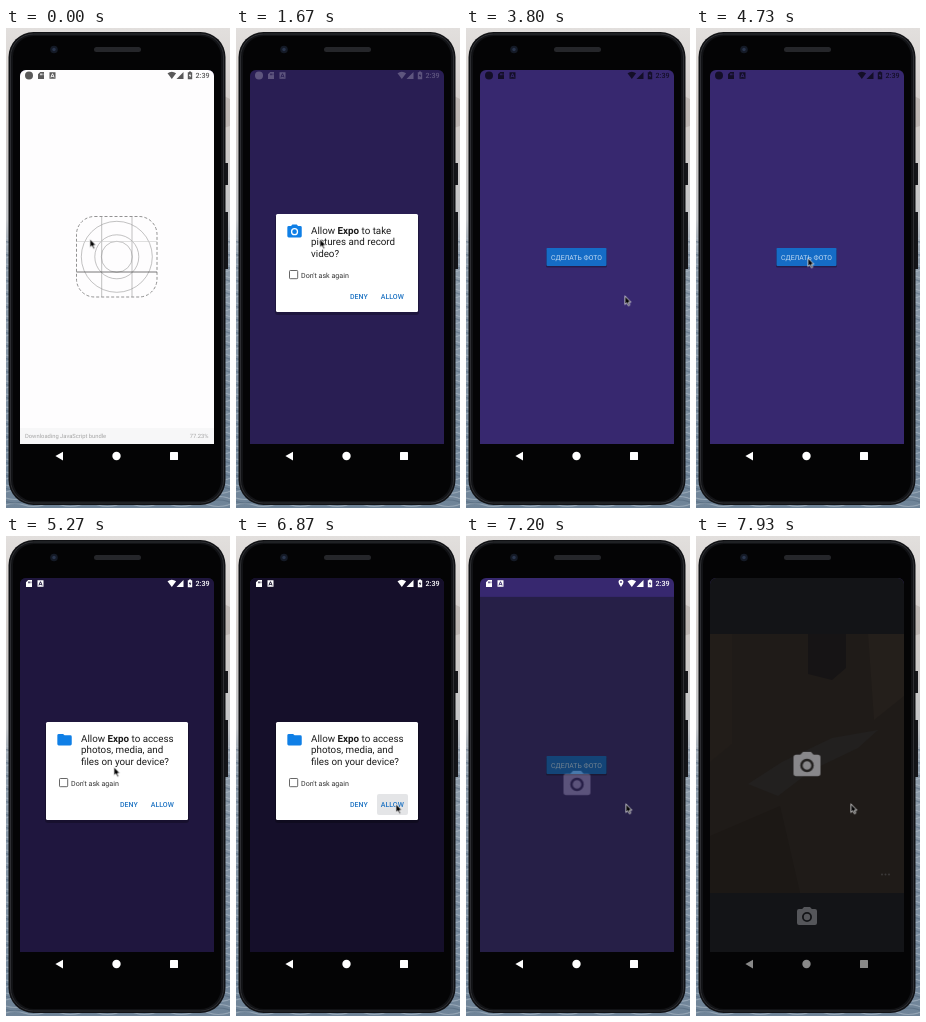
These frames come from a looping animation (224 by 480 pixels, 8000 ms). An HTML page:

```html
<!DOCTYPE html>
<html lang="en">
<head>
<meta charset="utf-8">
<title>Camera permissions</title>
<style>
html, body { margin: 0; width: 100%; height: 100%; overflow: hidden; background: #000; }
svg { display: block; width: 224px; height: 480px; font-family: Roboto, sans-serif; text-rendering: geometricPrecision; }
.anim { animation: 8s linear infinite; }

.loader { animation-name: loader; }
.splash { animation-name: splash; }
.ripple { animation-name: ripple; }
.dim { animation-name: dim; }
.tray { animation-name: tray; }
.tray-light { animation-name: tray-light; color: #fff; }
.pin { animation-name: pin; }
.ask-camera { animation-name: ask-camera; }
.ask-files { animation-name: ask-files; }
.press-camera { animation-name: press-camera; }
.press-files { animation-name: press-files; }
.camera { animation-name: camera; }
.preview { animation-name: preview; }
.nav { animation-name: nav; }
.pointer { animation-name: pointer; }

@keyframes loader { 0%, .9% { opacity: 1 } 3.3%, 100% { opacity: 0 } }
@keyframes splash { 0%, 10.9% { opacity: 1 } 13.3%, 100% { opacity: 0 } }
@keyframes ripple { 0%, 60.8% { opacity: 0 } 62% { opacity: .25 } 64%, 100% { opacity: 0 } }
@keyframes dim {
  0%, 20% { opacity: 0 } 20.9% { opacity: .25 } 22.5%, 35.9% { opacity: .6 }
  38.75%, 64.1% { opacity: 0 } 65.9% { opacity: .44 } 67.5%, 86.6% { opacity: .62 } 89.1%, 100% { opacity: 0 }
}
@keyframes tray {
  0%, 18.4% { color: #000; opacity: .65 } 20.6%, 35.9% { color: #fff; opacity: .25 }
  38.75%, 62% { color: #000; opacity: .65 } 64%, 100% { color: #000; opacity: 0 }
}
@keyframes tray-light { 0%, 62% { opacity: 0 } 64%, 91% { opacity: 1 } 94%, 100% { opacity: 0 } }
@keyframes pin { 0%, 88.9% { opacity: 0 } 89%, 100% { opacity: 1 } }
@keyframes ask-camera { 0%, 19.1% { opacity: 0 } 20.6%, 35.9% { opacity: 1 } 38.75%, 100% { opacity: 0 } }
@keyframes ask-files { 0%, 64.1% { opacity: 0 } 65.4%, 86.6% { opacity: 1 } 88.75%, 100% { opacity: 0 } }
@keyframes press-camera { 0%, 35.8% { opacity: 0 } 35.81%, 100% { opacity: 1 } }
@keyframes press-files { 0%, 85.74% { opacity: 0 } 85.75%, 100% { opacity: 1 } }
@keyframes camera {
  0%, 89.1% { opacity: 0; transform: translateY(26px) }
  90% { opacity: .45; transform: translateY(19px) }
  92.5%, 100% { opacity: 1; transform: none }
}
@keyframes preview { 0%, 96.6% { opacity: 0 } 99.1%, 100% { opacity: 1 } }
@keyframes nav { 0%, 90% { opacity: 1 } 95.9%, 100% { opacity: .53 } }
@keyframes pointer {
  0%, 22% { transform: translate(84px, 211px) }
  28.4% { transform: translate(138px, 257px) }
  33.4%, 48% { transform: translate(159px, 268px) }
  55.9% { transform: translate(120px, 239px) }
  59.1%, 61% { transform: translate(112px, 230px) }
  65.9%, 71.6% { transform: translate(108px, 231px) }
  79.1%, 92% { transform: translate(160px, 268px) }
  95.9%, 100% { transform: translate(155px, 268px) }
}
.msg { font-size: 9.8px; fill: #1c1c1c; }
.small { font-size: 7.1px; fill: #333; }
.action { font-size: 7px; font-weight: 500; fill: #1c72c2; }
.time { font-size: 7.2px; font-weight: 500; }
</style>
</head>
<body>
<svg viewBox="0 0 224 480">
  <defs>
    <linearGradient id="sky" x2="0" y2="1">
      <stop offset="0" stop-color="#e2dfdd"/>
      <stop offset=".2" stop-color="#d0cbc8"/>
      <stop offset=".4" stop-color="#c3c5c8"/>
      <stop offset=".48" stop-color="#8f9dab"/>
      <stop offset="1" stop-color="#6f8498"/>
    </linearGradient>
    <pattern id="waves" width="37" height="13" patternUnits="userSpaceOnUse">
      <path d="M0 2q9 3 18 0t19 0M0 9q9-3 18 0t19 0" fill="none" stroke="#b8c4cf" stroke-width="1.2"/>
      <path d="M0 5.5q9 3 18 0t19 0" fill="none" stroke="#4b6075" stroke-width="1.2"/>
    </pattern>
    <clipPath id="screen"><path d="M14 416V48a6 6 0 0 1 6-6H202a6 6 0 0 1 6 6V416z"/></clipPath>

    <path id="cam" fill-rule="evenodd" d="M9 2 7.17 4H4a2 2 0 0 0-2 2v12a2 2 0 0 0 2 2h16a2 2 0 0 0 2-2V6a2 2 0 0 0-2-2h-3.17L15 2zM12 17a5 5 0 1 1 0-10 5 5 0 0 1 0 10zM12 15.2a3.2 3.2 0 1 0 0-6.4 3.2 3.2 0 0 0 0 6.4z"/>
    <path id="folder" d="M10 4H4a2 2 0 0 0-2 2v12a2 2 0 0 0 2 2h16a2 2 0 0 0 2-2V8a2 2 0 0 0-2-2h-8z"/>

    <g id="card-icons" fill="currentColor">
      <path fill-rule="evenodd" d="M2.2 0H6V7H0V2.2zM2 1.6v1.6h.7V1.6zM3.3 1.6v1.6H4V1.6zM4.6 1.6v1.6h.7V1.6z"/>
      <path fill-rule="evenodd" d="M11.5.3h6v6.4h-6zM14 1.4l-1.6 4.2h.9l.3-.9h1.8l.3.9h.9L15 1.4zm.5 1 .6 1.6h-1.2z"/>
    </g>
    <g id="signal-icons" fill="currentColor">
      <path d="M161.5 45.3q4.3-3 8.6 0L165.800 51z"/>
      <path d="M177.500 44v7h-7z"/>
      <path fill-rule="evenodd" d="M183 43.500h2v.8h1.200v6.900h-4.400v-6.900h1.200zM184.300 45.300l-1.500 2.700h1v2l1.500-2.700h-1z"/>
      <text class="time" x="189.500" y="50.200">2:39</text>
    </g>
    <g id="dialog">
      <rect x="39" y="187" width="144" height="100" rx="3" opacity=".25"/>
      <rect x="40" y="186" width="142" height="98" rx="1.500" fill="#fff"/>
      <rect x="53.500" y="242.500" width="8.200" height="8.200" rx=".8" fill="none" stroke="#666"/>
      <text class="small" x="65" y="249.500">Don't ask again</text>
    </g>
    <rect id="pressed" x="141" y="258" width="31" height="21" rx="2" fill="#e4e5e7"/>
    <g id="actions" class="action">
      <text x="114" y="271">DENY</text>
      <text x="144.800" y="271">ALLOW</text>
    </g>
  </defs>

  <!-- Wallpaper -->
  <rect width="224" height="480" fill="url(#sky)"/>
  <path d="M214 66l10 5v27l-10 3z" fill="#aaa29e" opacity=".5"/>
  <rect y="205" width="224" height="275" fill="url(#waves)" opacity=".5"/>

  <!-- Phone body -->
  <path d="M218 135h4v22h-4zM218 184h4v57h-4z" fill="#15161a"/>
  <rect x="2.500" y="4" width="217" height="473" rx="25" fill="#111215"/>
  <rect x="4.500" y="6" width="213" height="469" rx="23" fill="none" stroke="#36383c" stroke-width=".8"/>
  <rect x="7" y="8" width="208" height="465" rx="21" fill="#040405"/>
  <rect x="88" y="19" width="47" height="5" rx="2.500" fill="#25262a"/>
  <circle cx="48" cy="21.500" r="3.800" fill="#141a26"/>
  <circle cx="48" cy="21.500" r="1.700" fill="#29354c"/>

  <g clip-path="url(#screen)">
    <!-- App -->
    <rect x="14" y="42" width="194" height="374" fill="#37286f"/>
    <rect x="80" y="221" width="61" height="18.500" rx="1.500" opacity=".3"/>
    <rect x="80.500" y="220" width="60" height="18" rx="1" fill="#156cc6"/>
    <rect class="anim ripple" x="80.500" y="220" width="60" height="18" rx="1" fill="#fff"/>
    <text x="110.500" y="231.600" text-anchor="middle" font-size="6.800" fill="#c3dcf3">СДЕЛАТЬ ФОТО</text>

    <!-- Splash -->
    <g class="anim splash">
      <rect x="14" y="42" width="194" height="374" fill="#fefdfe"/>
      <g fill="none" stroke="#999" stroke-width=".6">
        <rect x="70.500" y="188.500" width="80.500" height="80.500" rx="18" stroke="#777" stroke-width=".8" stroke-dasharray="3 2"/>
        <circle cx="110.800" cy="228.800" r="35.500"/>
        <circle cx="110.800" cy="228.800" r="22"/>
        <circle cx="110.800" cy="228.800" r="15.500"/>
        <path d="M95.700 188.500v80.500M126 188.500v80.500"/>
        <path d="M70.500 213.500h80.500" stroke="#ccc"/>
        <path d="M70.500 244h80.500" stroke="#555" stroke-width=".8"/>
      </g>
      <g class="anim loader" font-size="5.800" fill="#a6a6a6">
        <rect x="14" y="400" width="194" height="16" fill="#f7f7f8"/>
        <text x="19" y="409.700">Downloading JavaScript bundle</text>
        <text x="202.500" y="409.700" text-anchor="end">77.23%</text>
      </g>
    </g>

    <rect class="anim dim" x="14" y="42" width="194" height="374"/>

    <!-- Camera -->
    <g class="anim camera">
      <rect x="14" y="42" width="194" height="400" fill="#131417"/>
      <g class="anim preview">
        <rect x="14" y="98" width="194" height="259" fill="#1f1b18"/>
        <path d="M112 98h38v34l-14 12-24-6z" fill="#161415"/>
        <path d="M172 98h36v62l-30 24z" fill="#241f1b"/>
        <path d="M14 98h22v110l-22 18z" fill="#221d19"/>
        <path d="M52 248l34-22 50-24 46-8-20 18-46 22-34 26z" fill="#22201f"/>
        <path d="M14 300l70-30 20 87H14z" fill="#1c1815"/>
        <g fill="#3c3a39"><circle cx="186" cy="338.500" r="1"/><circle cx="189.500" cy="338.500" r="1"/><circle cx="193" cy="338.500" r="1"/></g>
        <use href="#cam" transform="translate(99 369)" fill="#55565a"/>
      </g>
      <use href="#cam" transform="translate(94.800 213.200) scale(1.350)" fill="#88878a"/>
    </g>

    <!-- Status bar -->
    <g class="anim tray">
      <circle cx="23" cy="47.500" r="4" fill="currentColor"/>
      <use href="#card-icons" x="32" y="44"/>
      <use href="#signal-icons"/>
    </g>
    <g class="anim tray-light">
      <use href="#card-icons" x="20" y="44"/>
      <use href="#signal-icons"/>
      <path class="anim pin" fill="#fff" fill-rule="evenodd" d="M155 43.500a2.500 2.500 0 0 1 2.500 2.500q0 2-2.500 5-2.500-3-2.500-5a2.500 2.500 0 0 1 2.500-2.500zm0 1.600a.9.9 0 1 0 0 1.800.9.9 0 0 0 0-1.800z"/>
    </g>
  </g>

  <!-- Permission dialogs -->
  <g class="anim ask-camera">
    <use href="#dialog"/>
    <use href="#cam" transform="translate(49.900 195) scale(.72)" fill="#0f7fe6"/>
    <g class="msg">
      <text x="75" y="206">Allow <tspan font-weight="700">Expo</tspan> to take</text>
      <text x="75" y="217.300">pictures and record</text>
      <text x="75" y="228.500">video?</text>
    </g>
    <use class="anim press-camera" href="#pressed"/>
    <use href="#actions"/>
  </g>
  <g class="anim ask-files">
    <use href="#dialog"/>
    <use href="#folder" transform="translate(49.900 195) scale(.72)" fill="#0f7fe6"/>
    <g class="msg">
      <text x="75" y="206">Allow <tspan font-weight="700">Expo</tspan> to access</text>
      <text x="75" y="217.300">photos, media, and</text>
      <text x="75" y="228.500">files on your device?</text>
    </g>
    <use class="anim press-files" href="#pressed"/>
    <use href="#actions"/>
  </g>

  <!-- Navigation -->
  <g class="anim nav" fill="#fff">
    <path d="M57 423.800v8.600l-7.600-4.300z"/>
    <circle cx="110.500" cy="428" r="4.200"/>
    <rect x="164" y="424" width="8" height="8" rx=".5"/>
  </g>

  <g class="anim pointer">
    <path d="M0 0V10L2.300 8 4 11.500 5.600 10.800 4 7.400H7z" transform="scale(.85)" fill="#000" stroke="#fff" stroke-width=".9"/>
  </g>
</svg>
</body>
</html>
```
